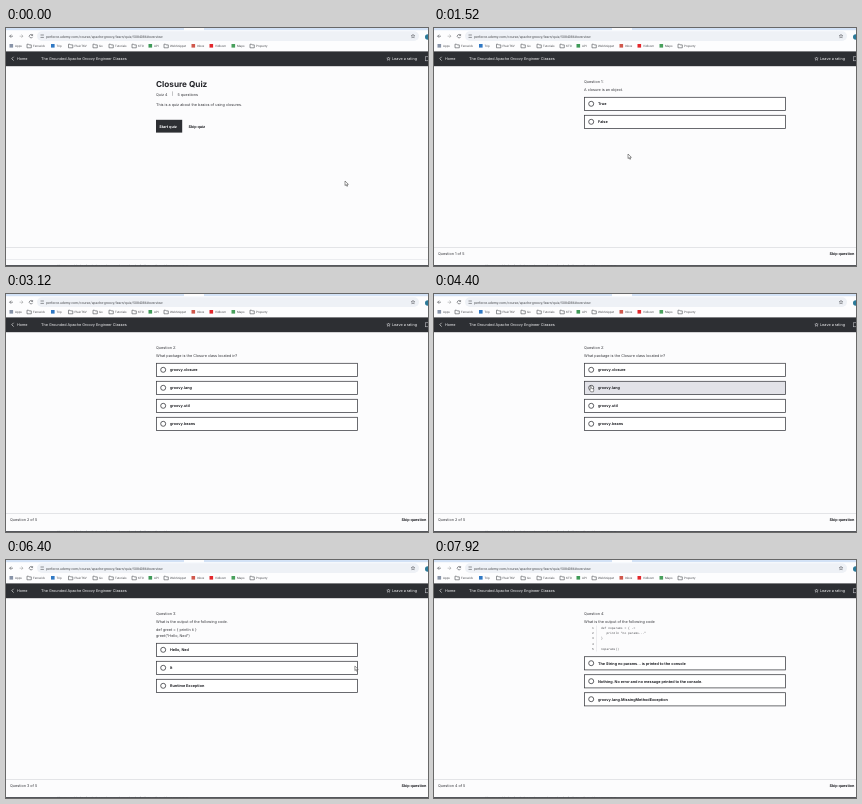
These frames come from a looping animation (422 px wide and 238 px high, 8 s). An HTML page:

```html
<!DOCTYPE html>
<html lang="en">
<head>
<meta charset="utf-8">
<title>Closure quiz</title>
<style>
  html, body { margin: 0; width: 100%; height: 100%; overflow: hidden; background: #fcfcfd; }
  svg { display: block; width: 100vw; height: 100vh; }
  text { font-family: Inter, "Open Sans", sans-serif; font-size: 3.75px; fill: #35363b;
         text-rendering: geometricPrecision; white-space: pre; }
  .bold { font-weight: 700; fill: #202126; }
  .title { font-size: 8.2px; font-weight: 700; fill: #25262b; }
  .chrome { font-family: Roboto, sans-serif; font-size: 3px; fill: #4a4c50; }
  .url { font-family: Roboto, sans-serif; font-size: 3.5px; fill: #4a4c50; }
  .light { fill: #f4f4f6; }
  .off { fill: #85868b; }
  .mono { font-family: "Liberation Mono", monospace; font-size: 3px; fill: #4a4b50; }
  .line { fill: none; stroke: #4b4d52; stroke-width: .6; }
</style>
</head>
<body>
<svg viewBox="0 0 422 238" preserveAspectRatio="none">
  <g id="browser"></g>
  <g id="page"></g>
  <g id="cursor"></g>
</svg>
<script>
const LOOP = 8000, STEP = 80;
const INK = '#2d2f33';
const $ = id => document.getElementById(id);

const text = (x, y, s, cls = '') => `<text x="${x}" y="${y}" class="${cls}">${s}</text>`;
const rect = (x, y, w, h, fill, extra = '') =>
  `<rect x="${x}" y="${y}" width="${w}" height="${h}" fill="${fill}" ${extra}/>`;
const circle = (x, y, r, fill, extra = '') =>
  `<circle cx="${x}" cy="${y}" r="${r}" fill="${fill}" ${extra}/>`;
const line = (d, extra = '') => `<path class="line" d="${d}" ${extra}/>`;

// label, text x, icon colour (a folder when omitted)
const bookmarks = [
  ['Apps', 9, '#8793a8'], ['Fernwick', 27], ['Trip', 50.5, '#2f78c4'], ['PlainTKV', 68.5],
  ['Go', 93], ['Tutorials', 109], ['KTO', 132], ['API', 148, '#3f9a58'], ['WebSnippet', 164],
  ['Inbox', 191, '#d0584c'], ['Vidloom', 209, '#e3262b'], ['Maps', 231, '#48a05c'],
  ['Property', 250]
];

function bookmark([label, x, colour]) {
  const icon = colour
    ? rect(x - 5.5, 16, 3.6, 3.6, colour)
    : line(`M${x - 6} 16.2h1.5l.6.7h2.2v2.9h-4.3z`);
  return icon + text(x, 19, label, 'chrome');
}

function star(x, y, r) {
  const points = Array.from({ length: 10 }, (_, i) => {
    const a = i * Math.PI / 5 - Math.PI / 2, k = i % 2 ? r * .45 : r;
    return `${x + k * Math.cos(a)},${y + k * Math.sin(a)}`;
  });
  return `<polygon points="${points.join(' ')}" fill="none" stroke="currentColor" stroke-width=".5"/>`;
}

const browser = () => [
  rect(0, 0, 422, 23.5, '#fdfdfe'),
  rect(0, 0, 422, 2.2, '#d3e2f6'),
  rect(178, 0, 20, 2.2, '#fdfdfe'),
  rect(31, 3.2, 382, 9.8, '#eef1f6', 'rx="4.9"'),
  line('M7 8.2H3.6m1.6-1.6-1.6 1.6 1.6 1.6'),
  line('M13.6 8.2H17m-1.6-1.6 1.6 1.6-1.6 1.6', 'opacity=".5"'),
  line('M26.4 7.2a1.7 1.7 0 1 0 .2 1.6m0-2.7v1.4h-1.4'),
  line('M34.5 7h3.4m-3.4 2.4h3.4'),
  text(40, 9.6, 'perforce.udemy.com/course/apache-groovy/learn/quiz/5084086#overview', 'url'),
  `<g color="#55575c">${star(407, 8.2, 2)}</g>`,
  circle(421.8, 9, 2.8, '#2b7a99'),
  bookmarks.map(bookmark).join(''),
  rect(0, 23.4, 422, 14.8, INK),
  line('M7.6 28.8 5.8 30.7l1.8 1.9', 'style="stroke:#fff"'),
  text(11, 32, 'Home', 'light'),
  text(35, 32, 'The Grounded Apache Groovy Engineer Classes', 'light'),
  `<g color="#d8d8dc">${star(382.5, 30.8, 1.8)}</g>`,
  text(386, 32, 'Leave a rating', 'light'),
  rect(419.5, 28.8, 4, 4, 'none', 'stroke="#d8d8dc" stroke-width=".5"'),
  rect(0, 219, 422, .7, '#d9dade'),
  rect(0, 237, 422, 1, '#55575c'),
  text(51, 239, 'Closures are blocks of code that can be passed around and called later, with or without parameters.', 'chrome')
].join('');

const intro = () => [
  text(150, 59, 'Closure Quiz', 'title'),
  text(150, 67.6, 'Quiz 4'), text(166, 67.4, '|'), text(171.5, 67.6, '5 questions'),
  text(150, 77.6, 'This is a quiz about the basics of using closures.'),
  rect(150, 91.8, 26.2, 12.8, INK),
  text(153.2, 99.7, 'Start quiz', 'bold light'),
  text(182.5, 99.7, 'Skip quiz', 'bold'),
  rect(0, 231, 422, .6, '#e2e3e6')
].join('');

const snippet = [
  'def noparams = { -&gt;', '   println "no params..."', '}', '', 'noparams()'
].map((s, i) => text(158, 68.6 + i * 5.4, i + 1, 'mono off') + text(167, 68.6 + i * 5.4, s, 'mono')).join('')
  + rect(162.4, 65.5, .4, 26, '#d4d5d9');

const questions = [
  { ask: 'A closure is an object.', top: 69, options: ['True', 'False'] },
  { ask: 'What package is the Closure class located in?', top: 69,
    options: ['groovy.closure', 'groovy.lang', 'groovy.util', 'groovy.beans'] },
  { ask: 'What is the output of the following code.', top: 83,
    code: text(150, 71.4, 'def greet = { println it }') + text(150, 77.3, 'greet("Hello, Ned")'),
    options: ['Hello, Ned', 'It', 'Runtime Exception'] },
  { ask: 'What is the output of the following code', top: 96.4, code: snippet,
    options: ['The String no params... is printed to the console',
      'Nothing. No error and no message printed to the console.',
      'groovy.lang.MissingMethodException'] }
];

function option(label, y, { picked, hovered, locked }) {
  const faded = locked && !picked;
  const ink = faded ? '#a3a4a8' : '#3a3b40';
  return rect(150.4, y + .3, 201.2, 13.2, hovered ? '#e2e2e8' : '#fff', `stroke="${ink}" stroke-width=".75"`)
    + circle(157.2, y + 6.8, 2.5, '#fff', `stroke="${ink}" stroke-width=".8"`)
    + (picked ? circle(157.2, y + 6.8, 1.35, INK) : '')
    + text(164, y + 8.1, label, faded ? 'off' : 'bold');
}

const banner = rect(150, 51, 202, 17, '#acd0cc')
  + circle(158.6, 59.4, 3.8, INK)
  + line('M156.8 59.5l1.3 1.3 2.3-2.6', 'style="stroke:#fff"')
  + text(167, 60.8, 'Good job!', 'bold');

function quiz({ question, picked, solved, hover }) {
  const { ask, top, code = '', options } = questions[question];
  const rows = options.map((label, i) => option(label, top + i * 18,
    { picked: i === picked, hovered: i === hover, locked: solved })).join('');
  return (solved ? banner : '')
    + `<g transform="translate(0 ${solved ? 23.2 : 0})">`
    + text(150, 55.4, `Question ${question + 1}:`) + text(150, 63.4, ask) + code + rows + '</g>'
    + text(4, 227.4, `Question ${question + 1} of 5`)
    + (solved ? '' : text(395.5, 227.4, 'Skip question', 'bold'));
}

// Each entry holds from its time until the next one.
const scenes = [
  [0, { question: -1 }],
  [560, { question: 0 }],
  [720, { question: 0, hover: 1 }],
  [1440, { question: 0 }],
  [2000, { question: 0, hover: 0 }],
  [2080, { question: 0, hover: 0, picked: 0 }],
  [2240, { question: 0, picked: 0 }],
  [2560, { question: 0, picked: 0, solved: true }],
  [3120, { question: 1 }],
  [3680, { question: 1, hover: 1 }],
  [4480, { question: 1, hover: 1, picked: 1 }],
  [4560, { question: 1, picked: 1 }],
  [5600, { question: 1, picked: 1, solved: true }],
  [5920, { question: 2 }],
  [6480, { question: 2, hover: 0 }],
  [6640, { question: 2, hover: 0, picked: 0 }],
  [6800, { question: 2, hover: 1, picked: 0 }],
  [6880, { question: 2, hover: 2, picked: 0 }],
  [7040, { question: 2, picked: 0 }],
  [7280, { question: 2, picked: 0, solved: true }],
  [7920, { question: 3 }]
];

// Pointer visits, each a list of [time, x, y]; hidden between visits.
const visits = [
  [[0, 339, 153], [320, 162, 97], [800, 162, 97], [1440, 192, 130], [1520, 194, 126],
   [1680, 194, 126], [1840, 212, 130], [1920, 212, 130], [2000, 157, 76], [2160, 157, 76],
   [2320, 413, 222], [2559, 412, 222]],
  [[3520, 409, 70], [3840, 156, 92], [4480, 156, 92], [4640, 397, 157], [4960, 397, 157],
   [5280, 413, 224], [5599, 413, 224]],
  [[6320, 416, 112], [6560, 157, 89], [6720, 157, 89], [6960, 314, 136], [7279, 314, 136]]
];

const ease = p => p * p * (3 - 2 * p);

function pointerAt(t) {
  const path = visits.find(v => t >= v[0][0] && t <= v[v.length - 1][0]);
  if (!path) return null;
  const i = Math.max(1, path.findIndex(p => p[0] >= t));
  const [t0, x0, y0] = path[i - 1], [t1, x1, y1] = path[i];
  const p = ease((t - t0) / (t1 - t0));
  return [x0 + (x1 - x0) * p, y0 + (y1 - y0) * p];
}

const arrow = '<path d="M0 0v4.6l1.1-1 .8 1.8.8-.4-.8-1.7h1.5z" fill="#fff" stroke="#333" stroke-width=".5"/>';
const hand = '<path d="M.3.3c.6-.5 1 0 1 .5v1.6l2 .5q.6.2.5.9l-.4 2H.8L-.6 3.6q.2-.6.9-.1z" fill="#fff" stroke="#333" stroke-width=".5"/>';

let shown = null;

function draw(now) {
  const t = Math.floor(now % LOOP / STEP) * STEP;
  const scene = scenes.filter(s => s[0] <= t).pop()[1];
  if (scene !== shown) {
    $('page').innerHTML = scene.question < 0 ? intro() : quiz(scene);
    shown = scene;
  }
  const at = pointerAt(t);
  const onOption = scene.hover !== undefined && at && at[0] < 200;
  $('cursor').innerHTML = at
    ? `<g transform="translate(${at[0]} ${at[1]})">${onOption ? hand : arrow}</g>` : '';
}

$('browser').innerHTML = browser();
const start = performance.now();
function tick() {
  draw(performance.now() - start);
  requestAnimationFrame(tick);
}
tick();
</script>
</body>
</html>
```
